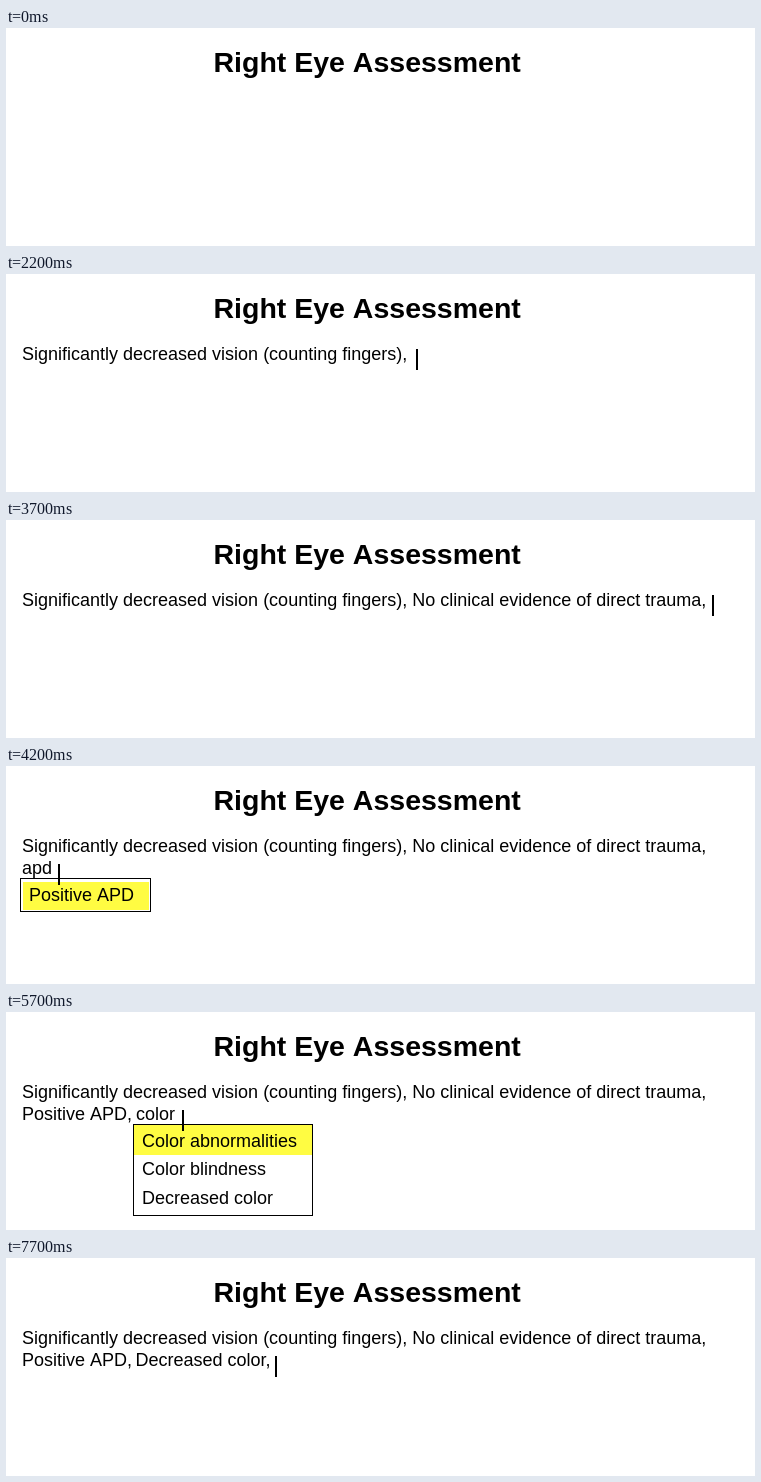
An HTML page with a canvas that plays this animation: 749 px wide and 218 px high, repeating every 8 s.

```html
<!DOCTYPE html>
<html lang="en">
<head>
<meta charset="utf-8">
<title>Right Eye Assessment</title>
<style>
  html, body { margin: 0; width: 100%; height: 100%; overflow: hidden; background: #fff; }
  canvas { display: block; }
</style>
</head>
<body>
<canvas id="stage" width="749" height="218"></canvas>
<script>
const ctx = document.getElementById('stage').getContext('2d');
const FAMILY = '"Liberation Sans", Arial, Helvetica, sans-serif';
const YELLOW = '#fffc42';
const LOOP = 8000;
const ROW1 = 86, ROW2 = 108;

const VISION = 'Significantly decreased vision (counting fingers)';
const TRAUMA = 'No clinical evidence of direct trauma';
const LINE1 = `${VISION}, ${TRAUMA},`;

function text(str, x, y, font = '18px') {
  ctx.font = `${font} ${FAMILY}`;
  ctx.fillStyle = '#000';
  ctx.fillText(str, x, y);
}

function caret(x, y) {
  ctx.fillStyle = '#000';
  ctx.fillRect(x, y, 2, 21);
}

function frame(x, y, w, h) {
  ctx.fillStyle = '#fff';
  ctx.fillRect(x, y, w, h);
  ctx.strokeStyle = '#000';
  ctx.lineWidth = 1;
  ctx.strokeRect(x + 0.5, y + 0.5, w - 1, h - 1);
}

// Popup with a single, selected suggestion
function suggestion(str, x, y, w) {
  frame(x, y, w, 34);
  ctx.fillStyle = YELLOW;
  ctx.fillRect(x + 3, y + 4, w - 5, 28);
  text(str, x + 9, y + 23);
}

function colorMenu(selected) {
  const rows = ['Color abnormalities', 'Color blindness', 'Decreased color'];
  const edges = [113, 143, 172, 203];
  frame(127, 112, 180, 92);
  ctx.fillStyle = YELLOW;
  ctx.fillRect(128, edges[selected], 178, edges[selected + 1] - edges[selected]);
  rows.forEach((row, i) => text(row, 136, 135 + Math.round(i * 28.4)));
}

function pointer(x, y) {
  ctx.save();
  ctx.translate(x, y);
  ctx.beginPath();
  ctx.moveTo(8, 17);
  ctx.lineTo(8, 4);
  ctx.quadraticCurveTo(10.5, -1.5, 13, 4);
  ctx.lineTo(13, 11);
  ctx.quadraticCurveTo(16, 9, 18, 12);
  ctx.quadraticCurveTo(21, 10, 23, 13);
  ctx.quadraticCurveTo(28, 12, 28, 17);
  ctx.quadraticCurveTo(28, 23, 24, 29);
  ctx.lineTo(12, 29);
  ctx.quadraticCurveTo(8, 23, 2, 18);
  ctx.quadraticCurveTo(2, 13, 8, 17);
  ctx.closePath();
  ctx.fillStyle = '#fff';
  ctx.fill();
  ctx.strokeStyle = '#000';
  ctx.lineWidth = 1.5;
  ctx.stroke();
  ctx.restore();
}

function colorEntry(selected) {
  text(LINE1, 16, ROW1);
  text('Positive APD,', 16, ROW2);
  text('color', 130, ROW2);
  colorMenu(selected);
  caret(176, 98);
}

const steps = [
  [0, () => {}],
  [200, () => pointer(17, 91)],
  [1200, () => {
    text('sdv-cf', 20, ROW1);
    suggestion(VISION, 20, 94, 406);
    caret(74.5, 77);
  }],
  [2200, () => {
    text(VISION + ',', 16, ROW1);
    caret(410, 75);
  }],
  [2700, () => {
    text(VISION + ',', 16, ROW1);
    text('ncedt', 406, ROW1);
    suggestion(TRAUMA, 405, 91, 311);
    caret(458, 75);
  }],
  [3700, () => {
    text(LINE1, 16, ROW1);
    caret(706, 75);
  }],
  [4200, () => {
    text(LINE1, 16, ROW1);
    text('apd', 16, ROW2);
    suggestion('Positive APD', 14, 112, 131);
    caret(52, 98);
  }],
  [5200, () => {
    text(LINE1, 16, ROW1);
    text('Positive APD,', 16, ROW2);
    caret(131, 98);
  }],
  [5700, () => colorEntry(0)],
  [6700, () => colorEntry(2)],
  [7700, () => {
    text(LINE1, 16, ROW1);
    text('Positive APD,', 16, ROW2);
    text('Decreased color,', 129.5, ROW2);
    caret(269, 98);
  }]
];

const start = performance.now();

function render() {
  const t = Math.max(0, performance.now() - start) % LOOP;
  ctx.fillStyle = '#fff';
  ctx.fillRect(0, 0, 749, 218);
  text('Right Eye Assessment', 207.5, 44, 'bold 28.5px');
  steps.filter(([at]) => at <= t).pop()[1]();
  requestAnimationFrame(render);
}
render();
</script>
</body>
</html>
```
